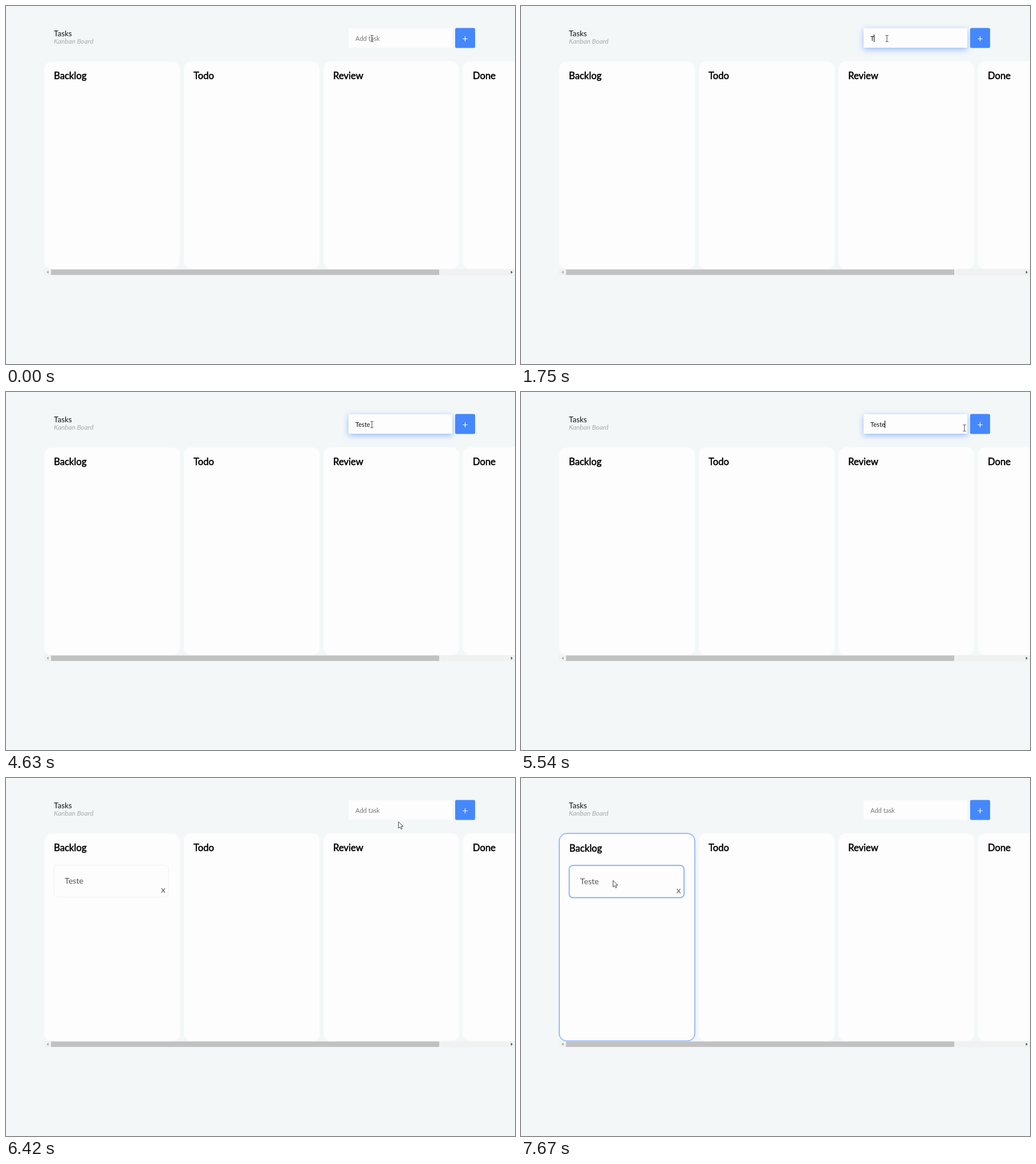
Animation, 893 px wide and 627 px high, one loop 8000 ms. Source, as an HTML page:

```html
<!DOCTYPE html>
<html lang="en">
<head>
<meta charset="utf-8">
<title>Task board</title>
<style>
  html, body { margin: 0; width: 100%; height: 100%; overflow: hidden; background: #f3f7f8; }
  svg { display: block; font-family: Lato, sans-serif; }
  .panel, #card { fill: #fdfdfe; }
  .title { font-size: 16.67px; stroke: #000; stroke-width: .55px; }
  .field { font-size: 11.11px; }
</style>
</head>
<body>
<svg width="893" height="627" viewBox="0 0 893 627">
  <text x="84" y="52.8" font-size="13.5" fill="#111">Tasks</text>
  <text x="84" y="66" font-size="11.75" font-style="italic" fill="#aaa">Kanban Board</text>

  <rect id="input" class="panel" x="601" y="39" width="182" height="34" rx="1.5"/>
  <text id="typed" class="field" x="613" y="61" xml:space="preserve"></text>
  <rect id="caret" y="50" width="1" height="13"/>
  <rect id="button" x="788" y="38.5" width="35" height="35" rx="2.5" fill="#4588fd"/>
  <path d="M801.2 57.5h8.6M805.5 53.2v8.6" stroke="#fff" stroke-width="1.2"/>

  <rect id="backlog" class="panel" x="67.3" y="97.3" width="237.5" height="363" rx="13"/>
  <rect class="panel" x="312" y="97" width="238" height="363.5" rx="13"/>
  <rect class="panel" x="557" y="97" width="238" height="363.5" rx="13"/>
  <rect class="panel" x="801.5" y="97" width="238" height="363.5" rx="13"/>
  <text class="title" x="329" y="128">Todo</text>
  <text class="title" x="574" y="128">Review</text>
  <text class="title" x="819" y="128">Done</text>
  <g id="content">
    <text class="title" x="84" y="128">Backlog</text>
    <g id="task">
      <rect id="card" x="84" y="152.5" width="201" height="56" rx="6"/>
      <text x="103" y="185.2" font-size="14.17" fill="#555">Teste</text>
      <text x="272" y="201" font-size="11.67" fill="#444">X</text>
    </g>
  </g>

  <rect x="67" y="461" width="826" height="10.5" fill="#f1f1f1"/>
  <rect x="79" y="461.5" width="681" height="9.5" fill="#c1c1c1"/>
  <path d="M74.5 463.5v5.5l-3-2.75z" fill="#a3a3a3"/>
  <path d="M885.8 463.5v5.5l3-2.75z" fill="#505050"/>

  <path id="beam" d="M-2.5-5.5h2l.5.5.5-.5h2M0-5V5M-2.5 5.5h2l.5-.5.5.5h2" fill="none" stroke="#444"/>
  <path id="arrow" d="M.5.5V12L3.2 9.5 5 13.5 7 12.6 5.2 8.7H8.7Z" fill="#fff" stroke="#333" stroke-width=".9" stroke-linejoin="round"/>
</svg>
<script>
const LOOP = 8000, ADDED = 5900, IN_COLUMN = 7310, IN_CARD = 7460;
const $ = id => document.getElementById(id);
const [input, typed, caret, button, backlog, content, task, card, beam, arrow] =
  ['input', 'typed', 'caret', 'button', 'backlog', 'content', 'task', 'card', 'beam', 'arrow'].map($);

// time, x, y
const path = [
  [0, 642, 57], [5420, 642, 57], [5540, 778, 63], [5640, 794, 65], [5950, 794, 65],
  [6080, 787, 66], [6210, 770, 71], [6600, 620, 82], [7040, 414, 72], [7130, 370, 69],
  [7400, 245, 128], [7640, 162, 180], [LOOP, 162, 180]
];
const typing = [
  [0, ''], [1750, 'T'], [2080, 'Te'], [2380, 'Tes'], [3330, 'Te'],
  [3790, 'Tes'], [3880, 'Test'], [4080, 'Teste'], [ADDED, '']
];
const caretOn = [[500, 1250], [1750, 2920], [3420, 4630], [5170, 5580]];

const clamp = v => Math.min(1, Math.max(0, v));
const ramp = (t, start, time) => {
  const p = clamp((t - start) / time);
  return p * p * (3 - 2 * p);
};
const fade = (t, on, off) => ramp(t, on, 270) - ramp(t, off, 270);
const show = (el, on) => el.setAttribute('visibility', on ? 'visible' : 'hidden');
const glow = (el, offset, blur, alpha) => {
  el.style.filter = alpha > 0 ? `drop-shadow(${offset} ${blur}px rgba(69,136,253,${alpha}))` : 'none';
};
const outline = (el, color, width) => {
  el.style.stroke = color;
  el.style.strokeWidth = width;
};

function pointer(t) {
  const i = path.findIndex(p => p[0] > t);
  const [t0, x0, y0] = path[i - 1], [t1, x1, y1] = path[i];
  const p = (t - t0) / (t1 - t0);
  return [x0 + (x1 - x0) * p, y0 + (y1 - y0) * p];
}

function draw() {
  const t = performance.now() % LOOP;

  const value = typing.filter(k => k[0] <= t).pop()[1];
  const label = value || 'Add task';
  if (typed.textContent !== label) typed.textContent = label;
  typed.setAttribute('fill', value ? '#111' : '#757575');
  show(caret, caretOn.some(([on, off]) => t >= on && t < off));
  caret.setAttribute('x', Math.floor(613 + (value ? typed.getComputedTextLength() : 0)));
  glow(input, '0 3px', 5.5, .55 * fade(t, 500, 5560));
  glow(button, '0 2px', 5, .5 * fade(t, 5570, 6040));

  const inColumn = t >= IN_COLUMN, inCard = t >= IN_CARD;
  show(task, t >= ADDED);
  content.setAttribute('transform', inColumn ? 'translate(.8 .8)' : '');
  outline(backlog, inColumn ? '#6c9cf5' : 'none', 1);
  outline(card, inCard ? '#6c9ff7' : '#eef0f0', inCard ? 1.2 : 1);
  glow(backlog, '.6px .6px', 1.2, .6 * ramp(t, IN_COLUMN, 200));
  glow(card, '0 .5px', 1.5, .5 * ramp(t, IN_CARD, 200));

  const [x, y] = pointer(t);
  const inField = x > 601 && x < 783 && y > 39 && y < 73;
  show(beam, inField);
  show(arrow, !inField);
  const px = Math.round(x), py = Math.round(y);
  beam.setAttribute('transform', `translate(${px} ${py})`);
  arrow.setAttribute('transform', `translate(${px - 1} ${py - 1})`);
  requestAnimationFrame(draw);
}
draw();
</script>
</body>
</html>
```
